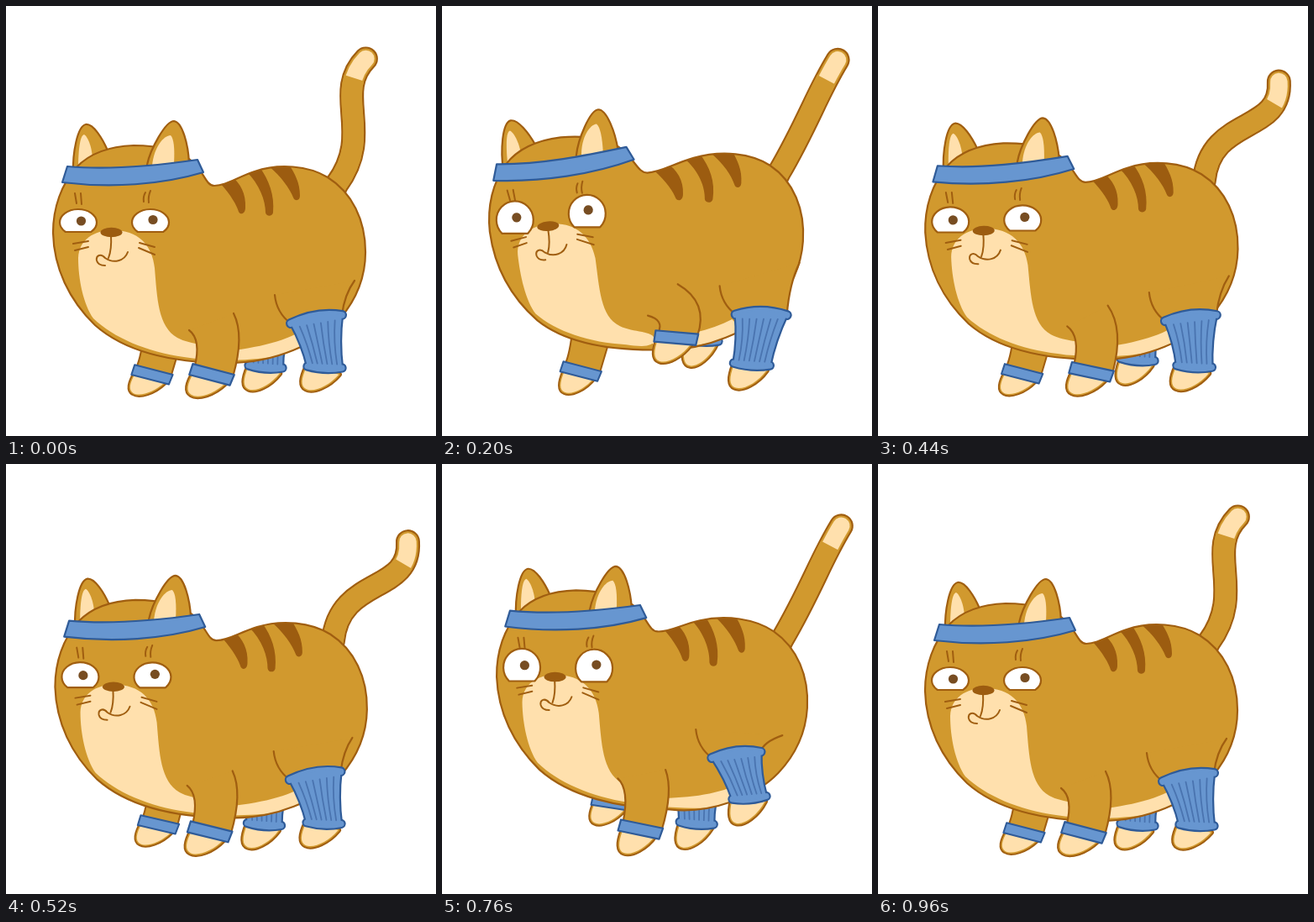
These frames come from a looping animation (512x512 px, 1 s). An HTML page with a canvas:

```html
<!DOCTYPE html>
<html lang="en">
<head>
<meta charset="utf-8">
<title>Workout cat</title>
<style>
html, body { margin: 0; height: 100%; overflow: hidden; background: #fff; }
canvas { display: block; width: 100vw; height: 100vh; }
</style>
</head>
<body>
<canvas id="stage" width="512" height="512"></canvas>
<script>
const ctx = document.getElementById('stage').getContext('2d');
const FUR = '#d1992e', LINE = '#a05e10', CREAM = '#ffe0ad', DARK = '#9c5c10';
const BLUE = '#6796d0', NAVY = '#2f5b98', RIB = '#4a74b0';
const RAD = Math.PI / 180;

// Walk cycle: one step swings up and down as a, the opposite step as b.
let a, b, swing;

function setPhase(p) {
  const s = Math.sin(2 * Math.PI * p);
  a = Math.max(s, 0);
  b = Math.max(-s, 0);
  swing = Math.cos(2 * Math.PI * p);
}

// Resting values plus the reach of each step.
const pose = (rest, da, db, u = a, v = b) => rest.map((r, i) => r + da[i] * u + db[i] * v);

// Bends the body: the head tilts, the rear lifts, blended in between.
function warp(x, y) {
  const u = Math.min(1, Math.max(0, (x - 220) / 120)), k = u * u * (3 - 2 * u);
  const hx = 9.3 * b + (.115 * a + .015 * b) * (Math.min(y, 330) - 262);
  const hy = -7.5 * a - 16.5 * b + (.01 * b - .09 * a) * (Math.min(x, 215) - 125);
  const rx = 7 * a + 11.5 * b - (.07 * a + .06 * b) * (y - 220);
  const ry = -17 * a - 9 * b + (.03 * a + .05 * b) * (x - 300);
  return [x + hx + (rx - hx) * k, y + hy + (ry - hy) * k];
}

const bend = d => d.replace(/(-?[\d.]+),(-?[\d.]+)/g, (_, x, y) => warp(+x, +y).join());

function draw(d, fill, stroke, width = 2.2) {
  const p = d instanceof Path2D ? d : new Path2D(d);
  if (fill) { ctx.fillStyle = fill; ctx.fill(p); }
  if (stroke) {
    ctx.strokeStyle = stroke;
    ctx.lineWidth = width;
    ctx.stroke(p);
  }
}

function at(x, y, deg, scale, paint) {
  ctx.save();
  ctx.translate(x, y);
  ctx.rotate(deg * RAD);
  ctx.scale(scale, scale);
  paint();
  ctx.restore();
}

function paw() {
  const d = 'M-21,2 C-26,18 -25,27 -18,29 C-9,32 8,22 18,6 Z';
  draw(d, null, LINE, 7);
  draw(d, null, FUR, 3);
  draw(d, CREAM);
}

const cuff = () => draw('M-25,-7 L26,-6.5 L24,7 L-26,6.5 Z', BLUE, NAVY);

function legWarmer([ax, ay, bx, by, cx, cy, dx, dy]) {
  const top = `M${ax},${ay} Q${(ax + bx) / 2},${(ay + by) / 2 - 10} ${bx},${by}`;
  const low = `Q${(cx + dx) / 2},${(cy + dy) / 2 + 5} ${cx},${cy}`;
  const brim = `M${dx},${dy} ${low}`;
  const sock = `${top} Q${(bx + dx) / 2 - 4},${(by + dy) / 2} ${dx},${dy}
    ${low} Q${(ax + cx) / 2 + 4},${(ay + cy) / 2} ${ax},${ay} Z`;
  for (const [color, edge] of [[NAVY, 4.4], [BLUE, 0]]) {
    draw(top, null, color, 7.6 + edge);
    draw(brim, null, color, 7 + edge);
    draw(sock, color, edge && color, edge);
  }
  for (let u = 1 / 7; u < .99; u += 1 / 7) {
    const mix = (p, q) => p + (q - p) * u;
    const x0 = mix(ax, bx), x1 = mix(cx, dx);
    draw(`M${x0 + (x1 - x0) * .12},${mix(ay, by) + 5}
      Q${(x0 + x1) / 2 + 4 - 8 * u},${mix(ay + cy, by + dy) / 2} ${x1},${mix(cy, dy) - 4}`, null, RIB, 1.8);
  }
}

// An S curve that leans back and flips its bend once per loop.
function drawTail() {
  const q = (1 + swing) / 2, lean = (37 - 24 * q * q) * RAD, length = 148 + 5 * q;
  const curl = 36 * swing - 6, sin = Math.sin(lean), cos = Math.cos(lean);
  let [x, y] = warp(394, 212);
  x += 8 * Math.min(swing, 0);
  const spot = (along, side) =>
    `${x + along * length * sin + side * cos},${y - along * length * cos + side * sin}`;
  const d = `M${spot(1, 0)} C${spot(.68, -curl)} ${spot(.45, curl)} ${spot(0, 0)} L${x - 4},${y + 8}`;
  draw(d, null, LINE, 29);
  draw(d, null, FUR, 24.6);
  draw(d, null, CREAM, 20.5);
  ctx.save();
  ctx.lineCap = 'butt';
  ctx.setLineDash([0, 27, 400, 0]);
  draw(d, null, FUR, 24.6);
  ctx.restore();
}

function drawNearFront() {
  const [x, deg, lx, ly, rx, ry] = pose([245, 14, 218, 386, 271, 366],
    [35, -10, 28, -18, 10, -36], [-9, -3, -9, -12, -5, -2]);
  const y = 439 - 47 * a * a - 4 * b;
  const sin = Math.sin(deg * RAD), cos = Math.cos(deg * RAD);
  const spot = (u, v) => [x + u * cos - v * sin, y + u * sin + v * cos];
  const [px, py] = spot(-22, -4), [qx, qy] = spot(25, -4);
  const left = `M${lx},${ly} Q${px + 8},${ly + (py - ly) * .25} ${px},${py}`;
  const right = `${qx},${qy} Q${qx + 14},${ry + (qy - ry) * .35} ${rx},${ry}`;
  at(x, y, deg - 8 * b, 1, paw);
  draw(`${left} L${right} Z`, FUR);
  draw(`${left} M${right}`, null, LINE);
  at(x, y, deg, 1, cuff);
}

function drawNearHind() {
  const lift = b * b;
  const sock = pose([339, 378, 400, 368, 359, 429, 400, 431],
    [11, -11, 11, 0, -12, -4, -10, -3], [-19, -30, -22, -27, -14, -32, -15, -38], a, lift);
  const [ax, ay, bx, by, cx, cy, dx, dy] = sock;
  const [rx, ry] = pose([415, 327], [11, -22], [-10, -4]);
  const left = `M${ax - 19},${ay - 34} Q${ax - 17},${ay - 13} ${ax},${ay}`;
  const right = `${bx},${by} Q${bx + 3},${ry * .6 + by * .4} ${rx},${ry}`;
  draw(`${left} L${right} Z`, FUR);
  draw(`${left} M${right}`, null, LINE);
  const tilt = Math.atan2(dy - cy, dx - cx) / RAD;
  at((cx + dx) / 2, (cy + dy) / 2, tilt + 6 - 6 * a - 6 * lift, 1, paw);
  legWarmer(sock);
}

function drawFarLegs() {
  const [hx, hy, hdeg] = pose([309, 430, 6], [0, -33, -14], [-6, -2, -6]);
  at(hx, hy, hdeg, .97, paw);
  legWarmer([hx - 28, hy - 50, hx + 28, hy - 50, hx - 20, hy - 2, hx + 20, hy + 1]);

  const [fx, fy, fdeg] = pose([174, 439, 14], [-9, -4, 0], [29, -37, -6]);
  at(fx, fy, fdeg - 8 * a, .92, paw);
  at(fx, fy, fdeg, .92, () => {
    draw('M-23,0 Q-19,-14 -23,-45 L26,-45 L24,0', FUR, LINE);
    cuff();
  });
}

function drawBody() {
  draw(bend('M80,200 C79,175 85,143 95,141 C104,140 115,158 121,172 L110,192 Z'), FUR, LINE);
  draw(bend('M86,194 C86,172 88,154 93,153 C98,156 103,170 103,184 Z'), CREAM);

  const body = new Path2D(bend(`M56,270 C57,312 75,350 106,380 C142,412 200,425 265,425
    C320,425 372,402 398,372 C420,346 428,320 428,293 C428,255 412,222 383,204
    C360,190 325,187 296,197 C275,204 262,214 248,214 C238,214 236,198 222,185
    C206,172 180,166 152,166 C125,167 100,175 84,192 C66,212 56,240 56,270 Z`));
  draw(body, FUR);
  ctx.save();
  ctx.clip(body);
  draw(bend(`M86,300 C87,278 105,267 127,267 C157,267 174,284 177,312
    C180,348 181,382 204,395 C220,404 247,402 247,412 C247,422 230,421 212,418
    C168,412 128,395 104,372 C92,355 86,325 86,300 Z`), CREAM);
  draw(bend('M240,413 C285,410 325,402 350,388 L365,403 C335,418 300,422 250,422 Z'), CREAM);
  draw(bend('M255,211 C268,225 275,238 277,245 C279,249 285,248 285,240 C286,224 279,211 269,203 Z'), DARK);
  draw(bend('M286,197 C302,212 309,232 309,246 C310,251 317,251 318,246 C320,225 313,207 302,192 Z'), DARK);
  draw(bend('M312,190 C328,203 338,218 342,228 C344,233 350,232 350,226 C350,210 344,200 336,187 Z'), DARK);
  ctx.restore();
  draw(body, null, LINE);
}

function drawFace() {
  const dot = (x, y, rx, ry, color) => {
    const p = new Path2D();
    p.ellipse(...warp(x, y), rx, ry, -.09 * a, 0, 7);
    draw(p, color);
  };
  const open = a + b, height = 27 + 12 * open;
  for (const cx of [86, 172]) {
    const [x, y] = warp(cx, 269), eye = new Path2D();
    eye.ellipse(x, y + 6 * open - .42 * height, 22, .58 * height, 0, Math.PI - .81, .81);
    eye.closePath();
    draw(eye, '#fff', LINE);
  }
  dot(89.5, 256, 5.6, 5.6, '#774d22');
  dot(175, 254.5, 5.6, 5.6, '#774d22');
  draw(bend(`M82,223 Q83,229 84,235 M89,223 L90,236 M166,222 Q163,227 164,233 M172,220 Q169,227 170,234
    M80,283 L98,280 M82,291 L98,287 M159,282 L177,287 M158,288 L177,296
    M125,273 Q126,290 122,300
    M145,293 C141,304 128,307 118,300 C113,294 107,297 108,303 C109,307 113,309 118,309`), null, LINE, 2);
  dot(125.5, 269.5, 13, 5.8, DARK);

  draw(bend('M168,189 C172,170 190,137 200,137 C210,138 217,165 218,187'), FUR, LINE);
  draw(bend('M174,190 C176,168 188,154 196,154 C200,158 201,170 200,188 Z'), CREAM);
  draw(bend('M73,191 C125,196 180,190 228,183 L235,198 C185,213 125,217 67,210 Z'), BLUE, NAVY);
}

function frame() {
  setPhase(Math.floor(performance.now() % 1000 / 40) / 24);
  ctx.fillStyle = '#fff';
  ctx.fillRect(0, 0, 512, 512);
  ctx.lineCap = ctx.lineJoin = 'round';
  drawTail();
  drawFarLegs();
  drawBody();
  drawNearHind();
  drawNearFront();
  drawFace();
  requestAnimationFrame(frame);
}
frame();
</script>
</body>
</html>
```
